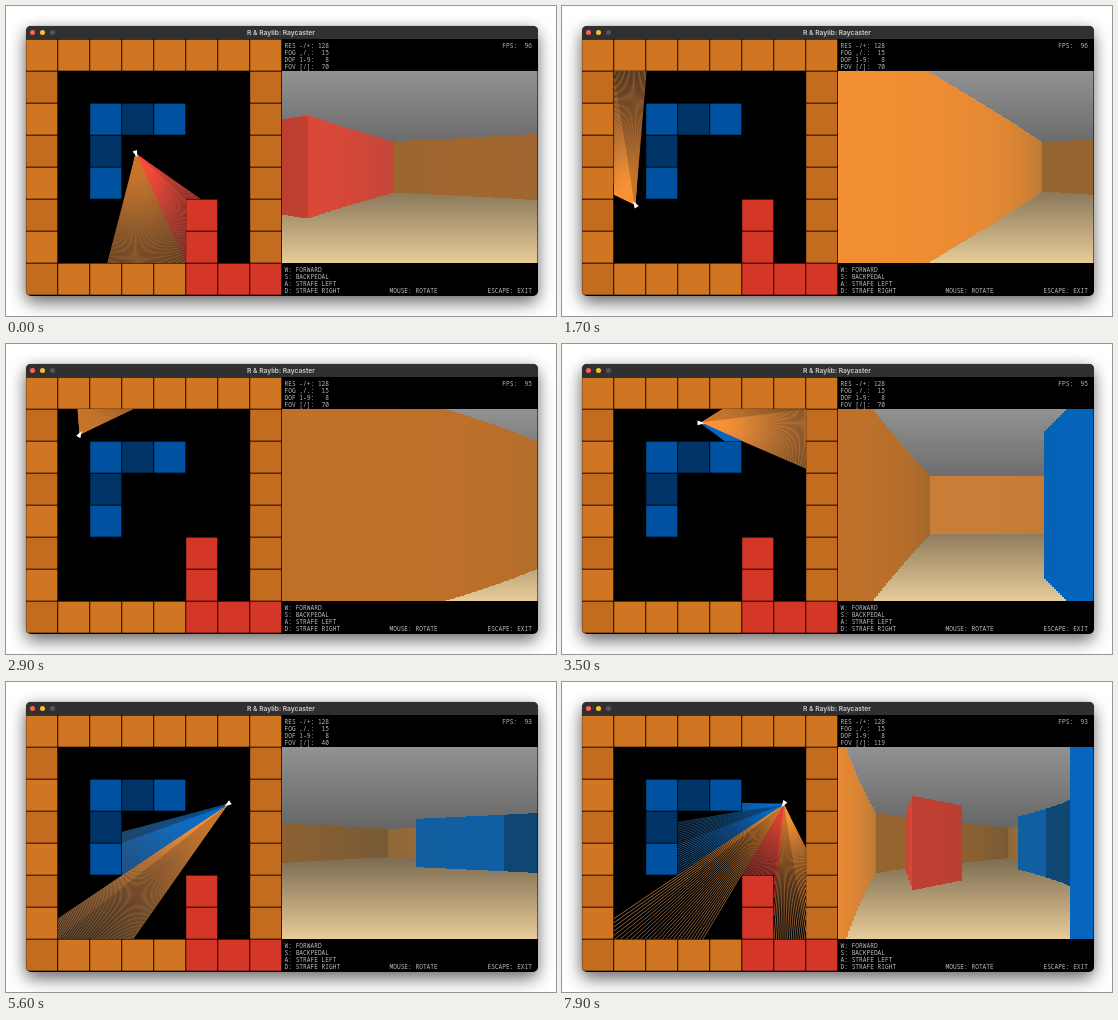
These frames come from a looping animation (550 by 310 pixels, 8000 ms). An HTML page with a canvas:

```html
<!DOCTYPE html>
<html lang="en">
<head>
<meta charset="utf-8">
<title>R &amp; Raylib: Raycaster</title>
<style>
  html, body { margin: 0; width: 550px; height: 310px; overflow: hidden; background: #fff; }
  #stage { position: relative; width: 550px; height: 310px; overflow: hidden; }
  #window {
    position: absolute; left: 19.5px; top: 19.5px; width: 512px; height: 270px;
    border-radius: 5px; background: #000; overflow: hidden;
  }
  #shadow {
    position: absolute; left: 20px; top: 20px; width: 511px; height: 269px; border-radius: 5px;
    box-shadow: 0 0 1px rgba(0,0,0,.5), 0 2px 14px rgba(0,0,0,.2), 0 8px 17px rgba(0,0,0,.5);
  }
  #bar { position: absolute; left: 0; top: 0; width: 100%; height: 13.5px; background: #303030; }
  #bar i { position: absolute; top: 4.2px; width: 5.6px; height: 5.6px; border-radius: 50%; }
  #bar b {
    position: absolute; left: 0; width: 511px; text-align: center; color: #cfcfcf;
    font: 600 6.7px/14px Inter, sans-serif;
  }
  canvas { position: absolute; left: 0; top: 0; clip-path: inset(19.5px 18.5px 20.5px 19.5px round 5px); }
  pre {
    position: absolute; margin: 0; color: #b8b8b8; white-space: pre;
    font: 6.2px/7px "Noto Sans Mono", "DejaVu Sans Mono", monospace;
  }
</style>
</head>
<body>
<div id="stage">
  <div id="shadow"></div>
  <div id="window">
    <div id="bar">
      <b>R &amp; Raylib: Raycaster</b>
      <i style="left:4.2px;background:#fe5f57"></i>
      <i style="left:14.2px;background:#febc2e"></i>
      <i style="left:24.2px;background:#555"></i>
    </div>
  </div>
  <canvas id="view" width="550" height="310"></canvas>
  <pre id="params" style="left:278.5px;top:35.5px"></pre>
  <pre id="fps" style="right:24px;top:35.5px"></pre>
  <pre style="left:278.5px;top:260px">W: FORWARD
S: BACKPEDAL
A: STRAFE LEFT
D: STRAFE RIGHT</pre>
  <pre style="left:383.5px;top:281px">MOUSE: ROTATE</pre>
  <pre style="right:24px;top:281px">ESCAPE: EXIT</pre>
</div>
<script>
const LOOP = 8000, STEP = 100;
const CELL = 32, MAP_X = 20, MAP_Y = 33;
const VIEW_X = 276, VIEW_Y = 65, VIEW_W = 256, VIEW_H = 192;
const RAYS = 128, FOG_RANGE = 12, FOG = [54, 70, 64], HAZE = [130, 122, 118];

// o/O orange, b/B blue (capital: darker tile), r red, R red tile with orange wall
const MAP = [
  'oooooooo',
  'O......O',
  'o.bBb..O',
  'O.B....O',
  'o.b....O',
  'O....r.O',
  'o....r.O',
  'OooooRRR',
];
const TILE = { o: '#d07522', O: '#c36c20', b: '#0051a0', B: '#003466', r: '#d43628', R: '#d43628' };
const ORANGE = { color: [255, 147, 50], dim: 0.79 };
const WALL = {
  o: ORANGE, O: ORANGE, R: ORANGE,
  b: { color: [0, 106, 206], dim: 0.96 },
  B: { color: [0, 72, 134], dim: 0.96 },
  r: { color: [255, 72, 54], dim: 0.87 },
};

// time, x, y, heading in degrees
const PATH = [
  [0, 130, 148, 69.8], [500, 133, 182, 105], [1000, 132, 214, 144.2],
  [1400, 92, 216, 190], [1800, 71, 190, 250], [2400, 72, 137, 269.7],
  [2900, 74, 90, 300], [3200, 100, 80, 345], [3500, 139, 79, 362.2],
  [3900, 192, 84, 430], [4400, 221.5, 122.3, 505.1], [7500, 221.5, 122.3, 505.1],
  [7900, 221.5, 122.3, 482.3],
];
const FOV = [[0, 70], [4190, 70], [4740, 20], [5390, 20], [6410, 119], [8000, 119]];
const FPS = [[0, 96], [2800, 95], [3800, 93], [7100, 94], [7300, 93]];

const ctx = document.getElementById('view').getContext('2d');
const params = document.getElementById('params');
const fpsLabel = document.getElementById('fps');
const rad = deg => deg * Math.PI / 180;
const css = c => `rgb(${c.map(Math.round)})`;
const mix = (a, b, t) => a.map((v, i) => v + (b[i] - v) * t);

function segment(keys, t) {
  let i = 0;
  while (i < keys.length - 2 && t >= keys[i + 1][0]) i++;
  return i;
}

function linear(keys, t) {
  const i = segment(keys, t), [t0, a] = keys[i], [t1, b] = keys[i + 1];
  return a + (b - a) * Math.min(1, (t - t0) / (t1 - t0));
}

// Cubic interpolation that never overshoots its keys
function smooth(keys, t, k) {
  const rate = i => keys[i + 1] && keys[i] ? (keys[i + 1][k] - keys[i][k]) / (keys[i + 1][0] - keys[i][0]) : 0;
  const slope = i => {
    const a = rate(i - 1), b = rate(i);
    return a * b > 0 ? 2 * a * b / (a + b) : 0;
  };
  const i = segment(keys, t), d = keys[i + 1][0] - keys[i][0];
  const u = Math.min(1, (t - keys[i][0]) / d), v = 1 - u;
  return keys[i][k] * (1 + 2 * u) * v * v + keys[i + 1][k] * (3 - 2 * u) * u * u
    + d * u * v * (slope(i) * v - slope(i + 1) * u);
}

// Walks the grid until a wall is met; lengths are in cells
function cast(px, py, angle) {
  const dx = Math.cos(angle), dy = Math.sin(angle);
  const sx = Math.sign(dx), sy = Math.sign(dy);
  const stepX = Math.abs(1 / dx), stepY = Math.abs(1 / dy);
  let cx = Math.floor(px), cy = Math.floor(py);
  let nextX = (dx > 0 ? cx + 1 - px : px - cx) * stepX;
  let nextY = (dy > 0 ? cy + 1 - py : py - cy) * stepY;
  for (;;) {
    const flat = nextY < nextX;
    const dist = flat ? nextY : nextX;
    if (flat) { cy += sy; nextY += stepY; } else { cx += sx; nextX += stepX; }
    const tile = MAP[cy]?.[cx] ?? 'o';
    if (tile !== '.') return { dist, flat, tile, dx, dy };
  }
}

function gradient(y, h, from, to) {
  const g = ctx.createLinearGradient(0, y, 0, y + h);
  g.addColorStop(0, from);
  g.addColorStop(1, to);
  ctx.fillStyle = g;
  ctx.fillRect(VIEW_X, y, VIEW_W, h);
}

function drawMap() {
  ctx.fillStyle = '#000';
  ctx.fillRect(MAP_X, MAP_Y + 0.5, 512, 256);
  MAP.forEach((row, r) => [...row].forEach((tile, c) => {
    if (tile === '.') return;
    ctx.fillStyle = TILE[tile];
    ctx.fillRect(MAP_X + c * CELL + 0.2, MAP_Y + r * CELL + 0.6, 31.1, 31.1);
  }));
}

// A map ray that pales with distance
function drawRay(x, y, hit, color, fog) {
  const ex = x + hit.dx * hit.dist * CELL, ey = y + hit.dy * hit.dist * CELL;
  const g = ctx.createLinearGradient(x, y, ex, ey);
  g.addColorStop(0, css(color));
  g.addColorStop(1, css(mix(color, HAZE, fog)));
  ctx.strokeStyle = g;
  ctx.beginPath();
  ctx.moveTo(x, y);
  ctx.lineTo(ex, ey);
  ctx.stroke();
}

function drawArrow(x, y, heading) {
  ctx.save();
  ctx.translate(x, y);
  ctx.rotate(heading);
  ctx.fillStyle = '#fff';
  ctx.beginPath();
  ctx.moveTo(3.5, 0);
  ctx.lineTo(-3.5, -2.4);
  ctx.lineTo(-3.5, 2.4);
  ctx.fill();
  ctx.restore();
}

function render(t) {
  const x = smooth(PATH, t, 1), y = smooth(PATH, t, 2);
  const heading = rad(smooth(PATH, t, 3)), fov = linear(FOV, t);
  const px = (x - MAP_X) / CELL, py = (y - MAP_Y) / CELL;
  const half = VIEW_H / 2, mid = VIEW_Y + half, col = VIEW_W / RAYS;

  ctx.clearRect(0, 0, 550, 310);
  drawMap();
  gradient(VIEW_Y, half, '#929292', '#5e5e5e');
  gradient(mid, half, '#685a45', '#e8cc98');

  ctx.lineWidth = 0.75;
  for (let i = 0; i < RAYS; i++) {
    const offset = rad(fov) * ((i + 0.5) / RAYS - 0.5);
    const hit = cast(px, py, heading + offset);
    const wall = WALL[hit.tile];
    const color = wall.color.map(v => v * (hit.flat ? wall.dim : 1));
    const fog = Math.min(1, hit.dist / FOG_RANGE);
    const h = Math.min(half, Math.round(half / (hit.dist * Math.cos(offset))));
    ctx.fillStyle = css(mix(color, FOG, fog));
    ctx.fillRect(VIEW_X + i * col, mid - h, col, h * 2);
    drawRay(x, y, hit, color, fog);
  }
  drawArrow(x, y, heading);

  const pad = n => String(Math.round(n)).padStart(3);
  params.textContent = `RES -/+: ${RAYS}\nFOG ,/.: ${pad(15)}\nDOF 1-9: ${pad(8)}\nFOV [/]: ${pad(fov)}`;
  fpsLabel.textContent = 'FPS: ' + pad(FPS.filter(k => k[0] <= t).pop()[1]);
}

let start, shown = -1;
function tick(now) {
  start ??= now;
  const t = Math.floor(((now - start) % LOOP) / STEP) * STEP;
  if (t !== shown) render(shown = t);
  requestAnimationFrame(tick);
}
render(0);
requestAnimationFrame(tick);
</script>
</body>
</html>
```
